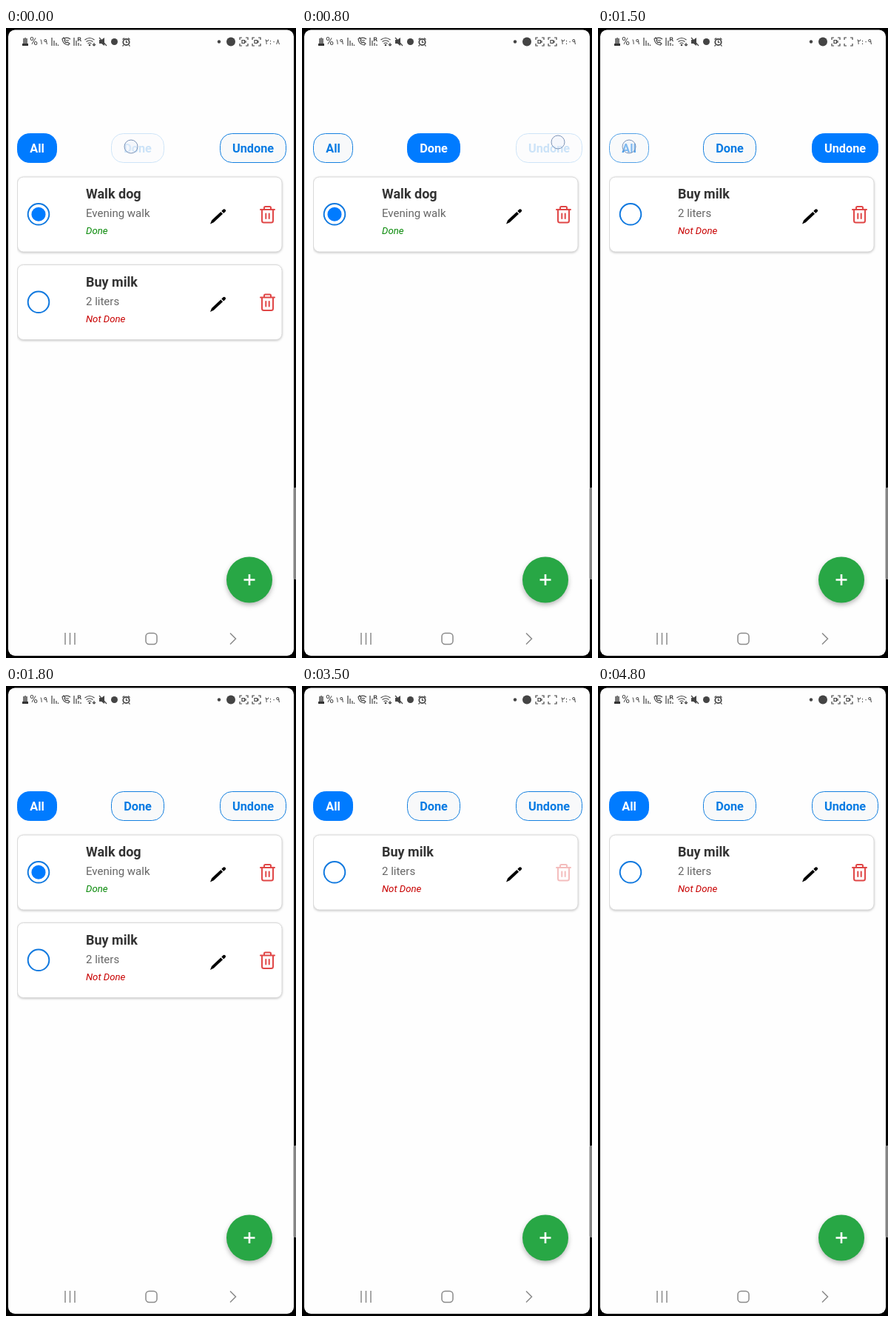
An HTML page that plays this animation: 392x850 px, repeating every 5.2 s.

```html
<!DOCTYPE html>
<html lang="en">
<head>
<meta charset="utf-8">
<title>To-do list</title>
<style>
html, body { margin: 0; width: 100%; height: 100%; overflow: hidden; background: #000; }
svg { display: block; width: 392px; height: 850px; }
text { font-family: Roboto, sans-serif; }
.tab { font-size: 16.3px; font-weight: 700; text-anchor: middle; }
.title { font-size: 18px; font-weight: 700; fill: #333; }
.note { font-size: 15px; fill: #666; }
.state { font-size: 13.2px; font-style: italic; }
.digits { font: 10.5px "DejaVu Sans", sans-serif; fill: #444; }
.line { fill: none; stroke: #444; stroke-width: 1.2; }
.nav { fill: none; stroke: #8a8a8a; stroke-width: 1.5; }
.bin { fill: none; stroke: #e04747; stroke-width: 2; stroke-linecap: round; stroke-linejoin: round; }
.card { filter: drop-shadow(0 1.5px 1.5px rgba(0,0,0,.22)); }
.fab { filter: drop-shadow(0 3px 3px rgba(0,0,0,.28)); }
</style>
</head>
<body>
<svg id="stage" viewBox="0 0 392 850">
  <defs><clipPath id="list"><rect x="15" y="190" width="370" height="500"/></clipPath></defs>
  <rect width="392" height="850"/>
  <rect x="3" y="2.5" width="386" height="844.5" rx="9" fill="#fefefe"/>
  <rect x="388.5" y="620" width="5" height="124" rx="2" fill="#858585"/>

  <g id="status">
    <path d="M23 14h2v-1h2v1h2v7h-6z" fill="#777"/><path d="M22 21h8v3h-8z" fill="#333"/>
    <text x="32" y="23" font-size="15" fill="#444">%</text>
    <text x="45" y="22" class="digits" font-size="9">١٩</text>
    <path class="line" d="M62 13v11M65 17v7M68 20v4M70.5 22.500v1.500M92 13v11M95 17v7M98 20v4M101 22v2M97.500 18v-5h2.500q1.500 1.300 0 2.600h-2.500M100 15.600l1.500 2.400"/>
    <path class="line" d="M76 15q1 7 8 8l2-2-3-2-2 1-2-3 1-1-2-3zM79 14q4-2 8 1M81 17q2-1 4 0"/>
    <path class="line" d="M106.500 16q6.500-5 13 0M108.500 18.500q4.500-3.500 9 0M110.500 21q2.500-2 5 0M119 20v4M117 22l2 2 2-2"/>
    <circle cx="113" cy="23" r="1.300" fill="#444"/>
    <path d="M126 16h3l4-3v11l-4-3h-3z" fill="#444"/><path class="line" d="M126 13l10 11"/>
    <circle cx="146.500" cy="18.500" r="4.500" fill="#444"/>
    <circle cx="162.500" cy="19" r="4.200" fill="none" stroke="#444" stroke-width="1.800"/>
    <path class="line" d="M157.500 15.500l2.500-2M167.500 15.500l-2.500-2M162.500 16.500v2.800h2M159 23l-1.500 1.500M166 23l1.500 1.500"/>
    <circle cx="288" cy="18.500" r="2.200" fill="#444"/>
    <circle cx="304" cy="18.500" r="6" fill="#444"/>
  </g>

  <g id="screen"></g>

  <circle class="fab" cx="329" cy="744.500" r="31" fill="#28a745"/>
  <path d="M321.500 744.500h15M329 737v15" stroke="#fff" stroke-width="2.600"/>
  <path class="nav" d="M80 816v16M86.500 816v16M93 816v16M303 816.500l7.500 7.500-7.500 7.500"/>
  <rect class="nav" x="189" y="816.500" width="15" height="15" rx="4.500"/>
</svg>
<script>
const LOOP = 5200, STEP = 100, BLUE = '#007bff';
const screen = document.getElementById('screen');

const tabs = [['All', 15, 54], ['Done', 142, 72], ['Undone', 289, 90]];
const walk = ['Walk dog', 'Evening walk', true];
const milk = ['Buy milk', '2 liters', false];

const taps = {
  Done:   [{ down: -200, up: 100, x: 169, y: 160 }],
  Undone: [{ down: 600, up: 850, x: 346, y: 154 }],
  All:    [{ down: 1450, up: 1550, x: 42, y: 160 }],
  bin:    [{ down: 3150, up: 3450, x: 353, y: 253 }],
  radio:  [{ down: 3850, up: 3950, x: 44, y: 253 },
           { down: 4350, up: 4550, x: 44, y: 253 }]
};

// Pressing dims to 0.2 in 150 ms; releasing restores in 250 ms.
function dim({ down, up }, t) {
  const pressed = 1 - .8 * Math.min(1, Math.max(0, Math.min(t, up) - down) / 150);
  return t < up ? pressed : pressed + (1 - pressed) * Math.min(1, (t - up) / 250);
}
const opacity = (name, t) => Math.min(...taps[name].map(tap => dim(tap, t)));

function tab([label, x, w], active, t) {
  return `<g opacity="${opacity(label, t)}">
    <rect x="${x + .5}" y="142.500" width="${w - 1}" height="39" rx="16"
      fill="${active ? BLUE : '#f8f9fa'}" stroke="${active ? BLUE : '#1480e0'}"/>
    <text class="tab" x="${x + w / 2}" y="168" fill="${active ? '#fff' : '#087be3'}">${label}</text></g>`;
}

function card([title, note, done], row, t) {
  const live = row === 0;
  return `<g transform="translate(0 ${row * 118.5})">
    <rect class="card" x="15.500" y="201" width="357.500" height="101" rx="8" fill="#fff" stroke="#d9d9d9"/>
    <g opacity="${live ? opacity('radio', t) : 1}">
      <circle cx="44" cy="251.300" r="14.300" fill="none" stroke="#1179df" stroke-width="2"/>
      ${done ? `<circle cx="44" cy="251.300" r="9.500" fill="${BLUE}"/>` : ''}
    </g>
    <text class="title" x="108" y="230">${title}</text>
    <text class="note" x="108" y="255">${note}</text>
    <text class="state" x="108" y="278" fill="${done ? '#0a8a0a' : '#c80000'}">${done ? 'Done' : 'Not Done'}</text>
    <path d="M276 264.500l2-5 12.300-11.600 2.800 2.900-12.300 11.500zM291.300 247l2.200-2.200q1.500-1.200 2.900.2t.1 2.700l-2.300 2.200z"/>
    <path class="bin" opacity="${live ? opacity('bin', t) : 1}"
      d="M344 245h19M349 244.500v-2q0-1.500 1.500-1.500h6q1.500 0 1.500 1.500v2M346 245.500v14.500q0 2.500 2.500 2.500h10q2.500 0 2.500-2.500v-14.500M351.300 250.500v6.500M355.700 250.500v6.500"/>
  </g>`;
}

function recorder(x, lit) {
  return `<path class="line" d="M${x} 16v-3h3M${x + 8} 13h3v3M${x + 11} 21v3h-3M${x + 3} 24h-3v-3"/>` +
    (lit ? `<path class="line" d="M${x + 3} 16.500h3.500v4h-3.500zM${x + 8} 17v3"/>` : '');
}

function pointer(t) {
  const tap = Object.values(taps).flat().find(({ down, up }) => t >= down && t < up);
  return tap ? `<circle cx="${tap.x}" cy="${tap.y}" r="9" fill="#e8eefa" fill-opacity=".35" stroke="#7d94b8"/>` : '';
}

function draw(t) {
  const [done, undone, all] = ['Done', 'Undone', 'All'].map(name => taps[name][0].up);
  const [check, uncheck] = taps.radio.map(tap => tap.up);
  const active = t < done ? 0 : t < undone ? 1 : t < all ? 2 : 0;
  const last = [milk[0], milk[1], t >= check && t < uncheck];
  const items = t >= taps.bin[0].up ? [last] : [[walk, milk], [walk], [milk]][active];
  screen.innerHTML =
    recorder(316, true) + recorder(333, (t + 300) % 1000 < 500) +
    `<text class="digits" x="350" y="22">٢:٠${t < done ? '٨' : '٩'}</text>` +
    tabs.map((item, i) => tab(item, i === active, t)).join('') +
    `<g clip-path="url(#list)">${items.map((item, i) => card(item, i, t)).join('')}</g>` +
    pointer(t);
}

const start = performance.now();
let shown = -1;
function tick() {
  const t = Math.floor((performance.now() - start) % LOOP / STEP) * STEP;
  if (t !== shown) draw(shown = t);
  requestAnimationFrame(tick);
}
tick();
</script>
</body>
</html>
```
